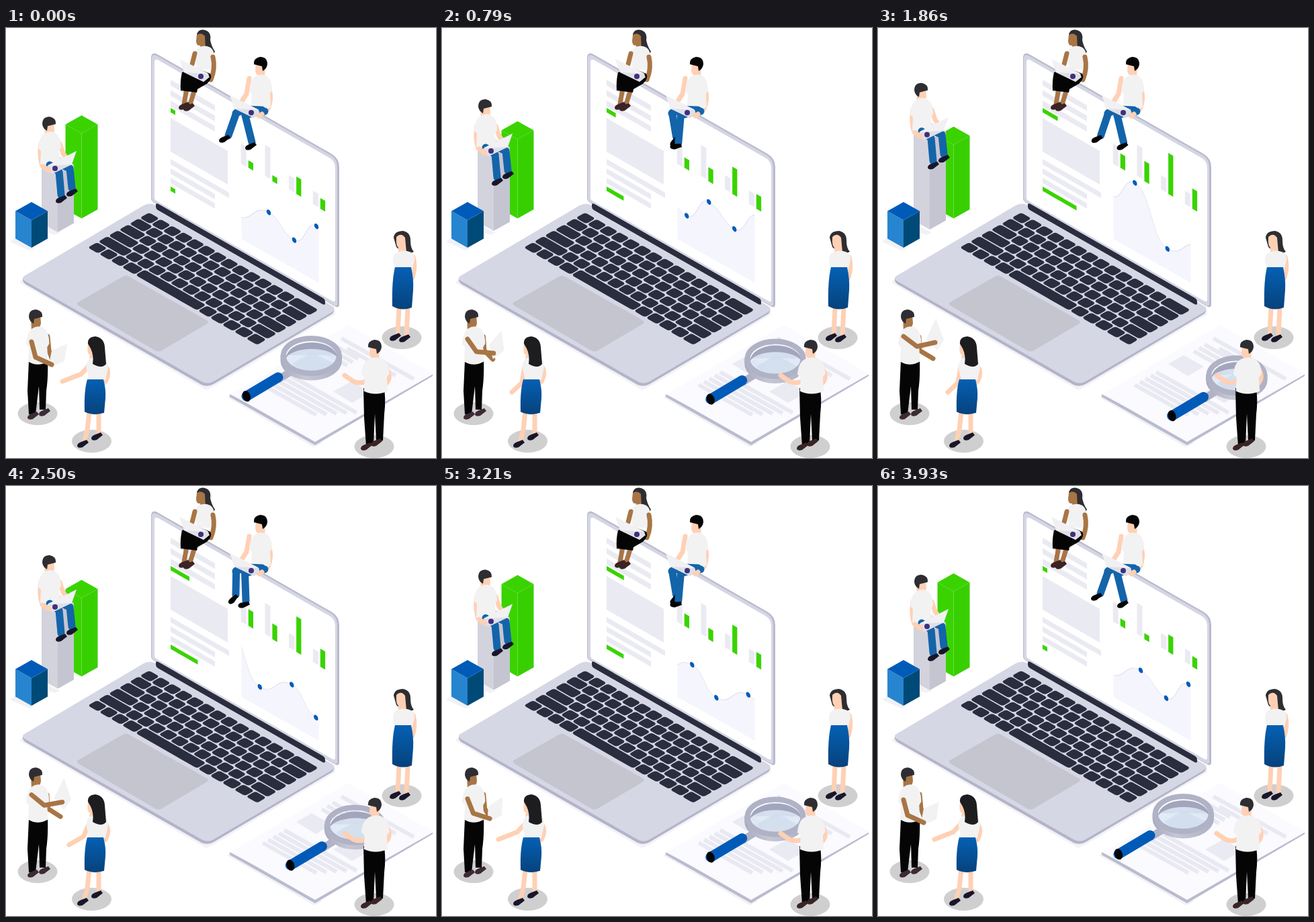
Animation of 640x640 px, one loop 4 s. Source, as an HTML page:

```html
<!DOCTYPE html>
<html lang="en">
<head>
<meta charset="utf-8">
<title>Isometric office</title>
<style>
html, body { margin: 0; width: 100%; height: 100%; overflow: hidden; background: #fff; }
svg { display: block; width: 100%; height: 100%; }
.limb { fill: none; stroke: currentColor; stroke-width: 7; stroke-linecap: round; stroke-linejoin: round; }
.light { color: #ffd0b4; } .dark { color: #a87545; }
.jean { color: #1464aa; stroke-width: 11; }
.face { fill: currentColor; }
.shirt { fill: #f2f2f3; } .hair { fill: #2e2e32; } .black { fill: #050506; }
.floor { fill: #cfcfcf; } .soft { fill: #eaeaf2; } .go { fill: #3ad300; }
</style>
</head>
<body>
<svg viewBox="0 0 640 640">
<defs>
  <clipPath id="plot"><path d="M350.5 200H465.5V379L350.5 314Z"/></clipPath>
  <linearGradient id="cloth" x2="0" y2="1"><stop stop-color="#0560b4"/><stop offset="1" stop-color="#06427c"/></linearGradient>
  <linearGradient id="rim" x2="1"><stop stop-color="#a9abc0"/><stop offset=".4" stop-color="#c6c7d5"/><stop offset="1" stop-color="#adafc3"/></linearGradient>
  <ellipse id="floor" rx="29.500" ry="17" class="floor"/>
  <path id="shoe" d="M0 9Q0 5 6 3L14 0L17 4L8 11Q1 13 0 9Z"/>
  <g id="head">
    <path d="M3 9L17 8L18 20Q17 27 14 27V35L4 34Z" class="face"/>
    <path d="M0 11Q0 0 11 0Q21 2 20 11L8 14L7 21Q1 18 0 11Z"/>
  </g>
  <path id="tee" d="M9 4Q17-1 25 3Q34 8 34 25L31 30L32 50Q17 58 3 50L4 30L0 26Q1 9 9 4Z" class="shirt"/>
  <path id="blouse" d="M6 4Q16-2 27 3Q34 8 33 17L29 36H5L1 20Q0 8 6 4Z" class="shirt"/>
  <path id="skirt" d="M4 0H28Q32 18 31 34L29 60Q14 66 0 58Q-1 20 4 0Z" fill="url(#cloth)"/>
  <g id="notebook">
    <path d="M0 0L42 21Q46 24 41 30L36 34L7 20Z" fill="#f1f1f4"/>
    <path d="M7 20L36 34L45 27L42 22Z" fill="#dfdfe7"/>
    <circle cx="32" cy="26" r="4" fill="#40307c"/>
  </g>
</defs>

<!-- bars -->
<path d="M6 318L14 313L42 328L35 331ZM42 297L53 291L80 305L72 308Z" fill="#f1f1f6"/>
<g id="bars"></g>

<!-- laptop -->
<path d="M20 379L298 539L312 532L490 426V418L300 530L26 372Z" fill="#f2f2f7"/>
<path d="M25 372V376Q26 380 32 383L291 531Q300 535 309 530L485 426Q489 423 488 416Z" fill="#b3b4c9"/>
<path d="M29 368L205 264Q214 259 223 264L484 413Q492 418 485 423L309 526Q300 531 291 526L29 377Q21 372 29 368Z" fill="#d6d7e5"/>
<path d="M216 254V45Q216 35 225 39L484 187Q496 194 496 207V411Q496 418 489 414L222 261Q216 258 216 254Z" fill="#b9bacd"/>
<path d="M217 254V46Q217 37 226 42L483 189Q493 195 493 207V410Q493 416 487 412L222 260Q217 258 217 254Z" fill="#d5d6e4"/>
<path d="M221 253V51Q221 45 227 48L481 193Q490 198 490 208V404Q490 409 485 406L225 258Q221 256 221 253Z" fill="#fff"/>
<path d="M223 263Q223 260 227 262L472 402Q475 404 475 408V410Q475 413 471 411L226 271Q223 269 223 266Z" fill="#2a2d3d"/>
<g id="keys" transform="matrix(1 .575 -1 .57 213 274)" fill="#2a2d3d"/>
<path d="M183 370L297 434Q304 438 298 441L232 480Q227 483 222 480L109 414Q102 410 109 407L174 370Q179 367 183 370Z" fill="#c4c5cf"/>
<g id="panel"></g>
<g clip-path="url(#plot)"><g transform="matrix(1 .56 0 1 0 -196.56)"><g id="wave"></g></g></g>

<!-- woman on the screen edge -->
<g class="dark">
  <path d="M284 9Q287 1 296 3Q306 6 304 18Q306 28 311 35Q307 43 299 38L288 25Z" class="hair"/>
  <path d="M284 10Q291 6 296 12L297 31L290 33L289 26Q283 27 283 19Z" class="face"/>
  <use href="#blouse" transform="translate(280 26) scale(.9 1)"/>
  <path d="M281 38L277 54M308 43Q312 60 305 77L294 73M269 90L265 113M281 91L273 117" class="limb"/>
  <path d="M262 66L284 60L304 68Q308 75 299 83L285 91L284 96L260 93Q259 78 262 66Z" class="black"/>
  <g fill="#3a2426"><use href="#shoe" x="257" y="110"/><use href="#shoe" x="264" y="112"/></g>
  <use href="#notebook" x="258" y="46"/>
</g>

<!-- man on the screen edge -->
<g class="light">
  <use href="#head" transform="translate(389 43) scale(-1 1)" class="black"/>
  <path d="M362 75L358 98L351 109M392 92Q396 106 390 120L377 130" class="limb"/>
  <use href="#tee" x="362" y="68"/>
  <path d="M381 122L356 121L342 127M385 124L370 126L356 130" class="limb jean"/>
  <g id="shinL"><path d="M343 126L331 160" class="limb jean"/><use href="#shoe" x="317" y="159" class="black"/></g>
  <g id="shinR"><path d="M356 130L366 170" class="limb jean"/><use href="#shoe" x="356" y="170" class="black"/></g>
  <use href="#notebook" x="333" y="100"/>
  <path d="M381 128L377 131" class="limb"/>
</g>

<!-- man on the bar -->
<g id="rider" class="light">
  <use href="#head" x="54" y="132" class="hair"/>
  <path d="M52 172Q49 190 54 205L62 211M80 172L85 187L92 196" class="limb"/>
  <use href="#tee" x="48" y="153"/>
  <path d="M65 204L79 214L82 248M80 203L95 209L98 238" class="limb jean"/>
  <g fill="#17162a"><use href="#shoe" x="74" y="249"/><use href="#shoe" x="90" y="239"/></g>
  <use href="#notebook" transform="translate(105 183) scale(-1 1)"/>
  <path d="M55 206L64 212" class="limb"/>
</g>

<!-- woman on the right -->
<g class="light">
  <use href="#floor" x="589" y="461"/>
  <path d="M577 312Q578 302 591 302Q602 304 602 316Q602 328 607 333L595 338L581 326Z" class="hair"/>
  <path d="M581 311Q588 304 594 312L596 334L584 335V327Q580 324 581 311Z" class="face"/>
  <path d="M606 341Q610 356 605 371L601 375M585 416L583 455M598 416L596 457" class="limb"/>
  <g fill="#17162a"><use href="#shoe" x="571" y="454"/><use href="#shoe" x="585" y="456"/></g>
  <use href="#blouse" transform="translate(575 331) scale(1 .85)"/>
  <use href="#skirt" x="575" y="356"/>
</g>

<!-- document -->
<path d="M330 550L458 624L470 618L456 608L338 543Z" fill="#f1f1f6"/>
<path d="M333 545V549L460 621L635 518V514L460 612Z" fill="#b9bbcf"/>
<path d="M509 442L636 515L460 616L335 545Z" fill="#fafaff"/>
<g id="doc" stroke="#e9e9f1" stroke-width="6"></g>
<path d="M432 500L455 487L485 504L461 518ZM487 541L514 526L543 542L515 558Z" class="soft"/>

<!-- magnifier -->
<g id="lens">
  <path d="M431 507L405 523" stroke="#b0b2c6" stroke-width="11"/>
  <path d="M358 548L405 520" class="limb" color="#005bb8" style="stroke-width:15"/>
  <ellipse cx="358" cy="548" rx="5.800" ry="8.300" transform="rotate(-18 358 548)" class="black"/>
  <path fill-rule="evenodd" fill="url(#rim)" d="M408.500 487V495A45.700 29.500 0 0 0 500 495V487ZM417 492A38 22 0 0 0 493 492A38 22 0 0 0 417 492Z"/>
  <ellipse cx="455" cy="491" rx="38" ry="23.500" fill="#dbe7f5" opacity=".8"/>
  <path d="M417 491A38 23 0 0 1 493 491A39 17 0 0 0 417 491Z" fill="#a2a5bc"/>
  <path d="M426 499L455 483L488 499Q474 512 455 512Q436 511 426 499Z" fill="#cddaec" opacity=".6"/>
  <ellipse cx="454.300" cy="488" rx="41.500" ry="26" fill="none" stroke="#b0b2c5" stroke-width="8"/>
</g>

<!-- man with the magnifier -->
<g class="light">
  <use href="#floor" x="548" y="623"/>
  <path d="M532 536L562 534Q566 550 563 575L561 614L551 614L549 574L547 621L536 622L533 580Z" class="black"/>
  <g fill="#3a2426"><use href="#shoe" x="528" y="617"/><use href="#shoe" x="543" y="611"/></g>
  <path d="M567 508Q574 520 566 529M539 524Q528 531 517 526L504 517" class="limb"/>
  <use href="#head" transform="translate(559 464) scale(-1 1)" class="hair"/>
  <use href="#tee" transform="translate(529 489) scale(1.22 1.03)"/>
</g>

<!-- man with the sheet -->
<g class="dark">
  <use href="#floor" x="47" y="574"/>
  <path d="M34 495L62 493Q63 520 60 540L59 568L50 568L49 533L44 575L34 575L32 540Z" class="black"/>
  <g fill="#3c2a35"><use href="#shoe" x="32" y="571"/><use href="#shoe" x="49" y="566"/></g>
  <use href="#head" x="34" y="419" class="hair"/>
  <path id="farArm" class="limb"/>
  <use href="#tee" transform="translate(30 443) scale(1.01 1.07)"/>
  <path id="sheet" fill="#f2f2f3"/>
  <path id="nearArm" class="limb"/>
</g>

<!-- woman reaching -->
<g class="light">
  <use href="#floor" x="127.500" y="615"/>
  <path d="M124 571L121 598L116 618M138 571L138 607M150 506Q154 515 148 526" class="limb"/>
  <g fill="#17162a"><use href="#shoe" x="106" y="613"/><use href="#shoe" x="127" y="602"/></g>
  <path id="reach" class="limb"/>
  <path d="M122 470L135 469V493L124 492L125 486Q120 487 122 470Z" class="face"/>
  <use href="#blouse" x="119" y="488"/>
  <path d="M122 470Q121 460 133 459Q146 461 147 475L149 500Q143 508 129 500Q131 487 126 477Z" fill="#1d1d20"/>
  <use href="#skirt" transform="translate(117 523) scale(1 .83)"/>
</g>
</svg>

<script>
const LOOP = 4000, FRAMES = 56;
const $ = id => document.getElementById(id);
const set = (el, attrs) => { for (const k in attrs) el.setAttribute(k, attrs[k]); return el; };
const add = (parent, tag, attrs = {}) =>
  set(parent.appendChild(document.createElementNS('http://www.w3.org/2000/svg', tag)), attrs);
const line = pts => 'M' + pts.join(' ');
const mix = (a, b, p) => line(a.map((v, i) => v + (b[i] - v) * p));

// Up over 0..a, hold until b, down by c
const ramp = (u, a, b, c) => Math.max(0, Math.min(1, u / a, (c - u) / (c - b)));
const peakAt = (u, p) => ramp(u, p, p, 1);

// Upright box around the vertical edge at x; y is the front top corner
function makeBox(left, right, top) {
  const [l, r, t] = [left, right, top].map(fill => add($('bars'), 'path', { fill }));
  return (x, y, foot) => {
    const w = 24, d = 13.5;
    set(l, { d: `M${x} ${y}V${foot}l${-w} ${-d}V${y - d}Z` });
    set(r, { d: `M${x} ${y}V${foot}l${w} ${-d}V${y - d}Z` });
    set(t, { d: `M${x} ${y}l${w} ${-d}l${-w} ${-d}l${-w} ${d}Z` });
  };
}
const greenBox = makeBox('#3ad300', '#38cf00', '#3ad300');
const grayBox = makeBox('#d3d3dd', '#c5c5d1', '#e2e2ea');
makeBox('#2785d0', '#004a78', '#005bb8')(38, 286, 327);

// Keyboard
for (let r = 0; r < 6; r++) {
  const lead = 1 + r / 3, n = r < 3 ? 12 : 11;
  const row = r < 5
    ? [lead, ...Array(n).fill(1), 15 - lead - n]
    : [1, 1, 1, 1.2, 5.5, ...Array(5).fill(1.06)];
  let x = 0;
  for (const w of row) {
    add($('keys'), 'rect', { x: x * 16.9 + .6, y: r * 15.5 + .6, width: w * 16.9 - 1.5, height: 13.9, rx: 3.6 });
    x += w;
  }
}

// Screen blocks, sheared along the panel
const block = (x, y, width, height, cls = 'soft') =>
  add($('panel'), 'rect', { x, y, width, height, class: cls, transform: `matrix(1 .575 0 1 0 ${-.575 * x})` });
for (let i = 0; i < 3; i++) {
  block(245, 77 + 15.5 * i, 66, 8.5);
  block(245, 195 + 14 * i, i ? 66 : 87, 8);
}
block(245, 134, 85, 50);
const dashes = [[119, 24.4, .74], [236, 46, .5]]
  .map(([y, grow, peak]) => ({ el: block(245, y, 7, 6.5, 'go'), grow, peak }));
const columns = [[172, 30, 197, 11, 14, .63], [174, 46, 219, 9, 24, .4], [219, 21, 221, 26, 37, .5], [242, 20, 253, 16, 15, .5]]
  .map(([soft, softH, y, h, grow, peak], i) => {
    const x = 360.7 + 35.7 * i;
    block(x - 11, soft, 8, softH);
    return { el: block(x, y, 7.3, h, 'go'), y, h, grow, peak };
  });

// Scrolling line chart
const SPAN = 324;
const knots = [[391, 252], [429, 272], [462, 233], [500, 252], [535.5, 213], [584, 284], [631.5, 254], [667.5, 283]];
const dots = [-1, 0, 1].flatMap(n => knots.map(([x, y]) => [x + n * SPAN, y]));
const curve = dots.slice(1).reduce((d, [x, y], i) => {
  const [px, py] = dots[i], m = (px + x) / 2;
  return `${d}C${m} ${py} ${m} ${y} ${x} ${y}`;
}, line(dots[0]));
add($('wave'), 'path', { d: `${curve}V320H${dots[0][0]}Z`, fill: '#f5f5fd' });
add($('wave'), 'path', { d: curve, fill: 'none', stroke: '#e3e3ef' });
for (const [cx, cy] of dots) add($('wave'), 'ellipse', { cx, cy, rx: 3.2, ry: 3.8, fill: '#005bb8' });

// Document text
const rule = (x, y, n) => add($('doc'), 'path', { d: `M${x} ${y}l${n} ${n * .56}` });
for (let i = 0; i < 5; i++) rule(382 + 8 * i, 531 - 4.7 * i, 80 + 7 * i);
for (let i = 0; i < 3; i++) rule(470 + 8 * i, 481 - 5 * i, 38);
for (let i = 0; i < 2; i++) rule(499 + 9 * i, 462 + 15 * i, 108 - 36 * i);

// u runs from 0 to 1 over the loop
function draw(u) {
  const up = 52 * ramp(u, .4, .46, .857);
  set($('rider'), { transform: `translate(0 ${-up})` });
  grayBox(77, 217 - up, 304 - up * .08);
  greenBox(112.5, 157 + up / 3, 283.5);

  for (const d of dashes) set(d.el, { width: 7 + d.grow * peakAt(u, d.peak) });
  for (const c of columns) {
    const h = c.grow * peakAt(u, c.peak);
    set(c.el, { y: c.y - h, height: c.h + h });
  }
  set($('wave'), { transform: `translate(${-SPAN * u} 0)` });

  const swing = (1 - Math.cos(u * Math.PI * 4)) / 2;
  set($('shinL'), { transform: `rotate(${-32 * swing} 343 127)` });
  set($('shinR'), { transform: `rotate(${21 * swing} 356 128)` });

  const go = peakAt(u, .5);
  set($('lens'), { transform: `translate(${83 * go ** .75} ${33 * go ** 2.18})` });

  const lift = ramp(u, .39, .62, .84);
  set($('sheet'), { d: mix([68, 480, 91, 470, 87, 496, 63, 506], [72, 463, 86, 432, 98, 464, 88, 480], lift) + 'Z' });
  set($('nearArm'), { d: mix([38, 467, 44, 490, 68, 501], [38, 459, 58, 474, 85, 468], lift) });
  set($('farArm'), { d: mix([62, 459, 64, 480, 69, 494], [61, 460, 62, 480, 82, 492], lift) });
  set($('reach'), { d: mix([124, 502, 112, 515, 84, 526], [123, 504, 119, 528, 104, 542], ramp(u, .19, .5, .77)) });
}

const start = performance.now();
function tick() {
  const t = (performance.now() - start) % LOOP;
  draw(Math.floor(t / LOOP * FRAMES) / (FRAMES - 1));
  requestAnimationFrame(tick);
}
tick();
</script>
</body>
</html>
```
